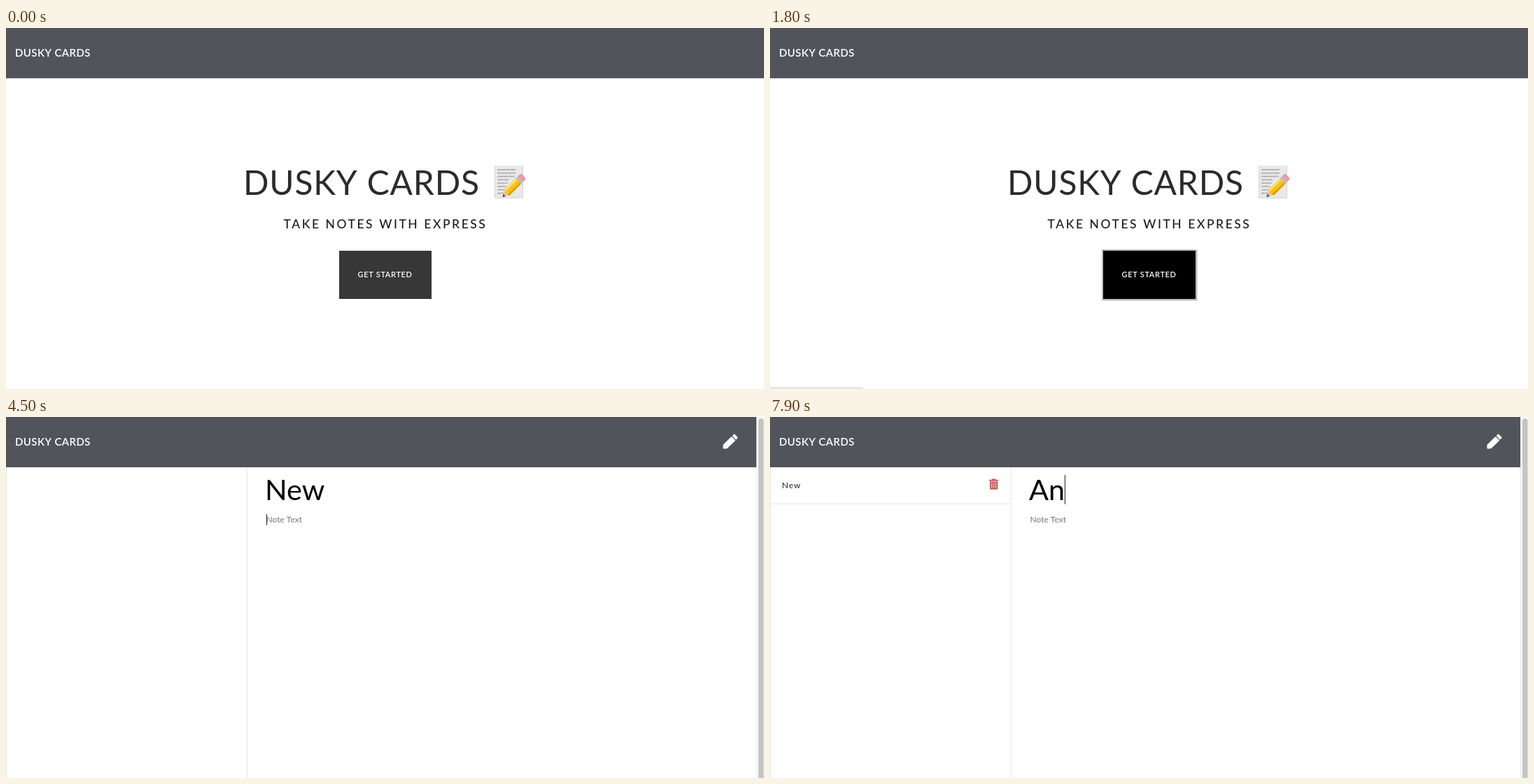
These frames come from a looping animation (1083x517 px, 8000 ms). An HTML page with a canvas:

```html
<!DOCTYPE html>
<html lang="en">
<head>
<meta charset="utf-8">
<title>Note taker</title>
<style>
  html, body { margin: 0; width: 100%; height: 100%; overflow: hidden; background: #fff; }
  canvas { display: block; }
</style>
</head>
<body>
<canvas id="stage" width="1083" height="517"></canvas>
<script>
const ctx = document.getElementById('stage').getContext('2d');
const LOOP = 8000;
const BRAND = 'DUSKY CARDS';
const HEADER = '#51545b';

// Times in ms
const HOVER = 1200, PRESS = 1700, EDITOR = 1900, SAVED = 6200;
const titleKeys = [[3500, 'N'], [3700, 'Ne'], [3900, 'New'], [SAVED, ''], [7400, 'A'], [7700, 'An']];
const textKeys = [[4700, 'N'], [4850, 'No'], [5000, 'Not'], [5100, 'Note'], [SAVED, '']];
const focusChanges = [[2600, 'title'], [4400, 'text'], [SAVED, ''], [7000, 'title']];

const latest = (steps, t) => steps.filter(s => s[0] <= t).pop() || [0, ''];

function rect(x, y, w, h, color, radius = 0) {
  ctx.fillStyle = color;
  ctx.beginPath();
  ctx.roundRect(x, y, w, h, radius);
  ctx.fill();
}

function poly(points, color, round = 0) {
  ctx.beginPath();
  points.forEach(([x, y]) => ctx.lineTo(x, y));
  ctx.closePath();
  ctx.fillStyle = ctx.strokeStyle = color;
  ctx.fill();
  if (round) {
    ctx.lineJoin = 'round';
    ctx.lineWidth = round;
    ctx.stroke();
  }
}

function text(str, x, y, size, color, weight = 400, spacing = 0) {
  ctx.font = `${weight} ${size}px Lato, sans-serif`;
  ctx.letterSpacing = spacing + 'px';
  ctx.fillStyle = color;
  ctx.fillText(str, x, y);
  return ctx.measureText(str).width;
}

function header(width) {
  rect(0, 0, width, 72, HEADER);
  text(BRAND, 13, 41, 15, '#fff', 600, 0.4);
}

function memo() {
  rect(698, 197, 41, 47, '#d6d6d6', 1);
  rect(699, 197, 39, 46, '#e9e9e9', 1);
  ctx.strokeStyle = '#777';
  ctx.lineWidth = 0.8;
  ctx.beginPath();
  for (let row = 0; row < 8; row++) {
    const y = 203 + row * 4.8, end = row < 3 ? 729 - row : 724 - row * 1.8;
    for (let x = 702; x < end; x += 0.7) {
      const wave = Math.sin(x * 2.3 + row) * (0.7 + 0.5 * Math.sin(x + row * 2));
      x === 702 ? ctx.moveTo(x, y + wave) : ctx.lineTo(x, y + wave);
    }
  }
  ctx.stroke();

  ctx.save();
  ctx.translate(709.5, 242);
  ctx.rotate(-Math.PI / 4);
  ctx.scale(1.04, 1.1);
  poly([[0, 0], [9, -5], [9, 5]], '#e5c493');
  poly([[0, 0], [3.5, -2], [3.5, 2]], '#3c3c3c');
  rect(8, -5, 23, 10, '#f3c31c');
  rect(8, -5, 23, 3, '#ffe15a');
  rect(8, 2.5, 23, 2.5, '#d99d12');
  rect(31, -5, 4, 10, '#b9bcc0');
  rect(35, -5, 6, 10, '#ec9aa0', [0, 3, 3, 0]);
  ctx.restore();
}

function landing(t) {
  header(1083);
  text(BRAND, 339, 239, 48, '#2b2b2b', 400, 0.8);
  memo();
  text('TAKE NOTES WITH EXPRESS', 396.5, 287, 17.5, '#1d1d1d', 500, 2.55);

  const shade = Math.round(55 * (1 - Math.min(1, Math.max(0, (t - HOVER) / 150))));
  if (t >= PRESS) rect(474, 317, 136.5, 73.5, '#bdbdbd');
  rect(476, 319, 132, 69, `rgb(${shade},${shade},${shade})`);
  text('GET STARTED', 502.5, 357, 11, '#fff', 600, 0.65);

  if (t >= HOVER + 100) rect(-3, 514, 138, 12, '#e6e6e6', 6);
}

function pencilIcon() {
  poly([[1025.5, 44.5], [1025.5, 40.3], [1036.6, 29.2], [1041, 33.6], [1029.8, 44.3]], '#fff', 2);
  poly([[1038.9, 26.9], [1040.6, 25.4], [1044.6, 29.4], [1043.1, 31.2]], '#fff', 2);
}

function saveIcon() {
  poly([[978.5, 27.5], [990.3, 27.5], [993.5, 30.7], [993.5, 42.7], [978.5, 42.7]], '#fff', 3);
  rect(980, 29, 10, 4.6, HEADER, 0.5);
  rect(983, 36.4, 5.2, 5.2, HEADER, 2.6);
}

function trashIcon() {
  const red = '#c0615b';
  rect(317, 88.5, 5.5, 2.5, red, 1);
  rect(313, 89.8, 13.3, 2, red, 0.5);
  rect(314, 92.6, 11.4, 11.2, red, [0, 0, 1.5, 1.5]);
  for (let i = 0; i < 3; i++) rect(316.3 + i * 2.9, 94.4, 1, 7.6, '#f3d9d7');
}

function field(value, hint, x, y, size, hintColor, caret, top, height) {
  const width = text(value || hint, x, y, size, value ? '#000' : hintColor);
  if (caret) rect(Math.round(x + (value ? width : 0)), top, 1, height, '#222');
}

function editor(t) {
  header(1072);
  rect(1072, 0, 11, 517, '#fafafa');
  rect(1072, 0, 1, 517, '#e8e8e8');
  rect(1075, 2, 7.5, 540, '#c4c4c4', 4);
  rect(0, 72, 1, 445, '#e6e6e6');
  rect(344, 72, 1, 445, '#e6e6e6');

  const [titleTime, title] = latest(titleKeys, t);
  const [textTime, body] = latest(textKeys, t);
  const [focusTime, focus] = latest(focusChanges, t);
  const lastKey = Math.max(focusTime, focus === 'title' ? titleTime : textTime);
  const blink = (t - lastKey) % 1000 < 500;
  field(title, 'Note Title', 370, 118.5, 41.5, '#808080', blink && focus === 'title', 83, 42);
  field(body, 'Note Text', 371.5, 151, 12, '#757575', blink && focus === 'text', 139, 16);

  pencilIcon();
  if (title && body) saveIcon();
  if (t >= SAVED) {
    text('New', 17, 102, 12, '#222', 400, 0.9);
    trashIcon();
    rect(1, 124, 343, 1, '#e3e3e3');
  }
}

function frame(now) {
  const t = now % LOOP;
  rect(0, 0, 1083, 517, '#fff');
  (t < EDITOR ? landing : editor)(t);
  requestAnimationFrame(frame);
}
requestAnimationFrame(frame);
</script>
</body>
</html>
```
